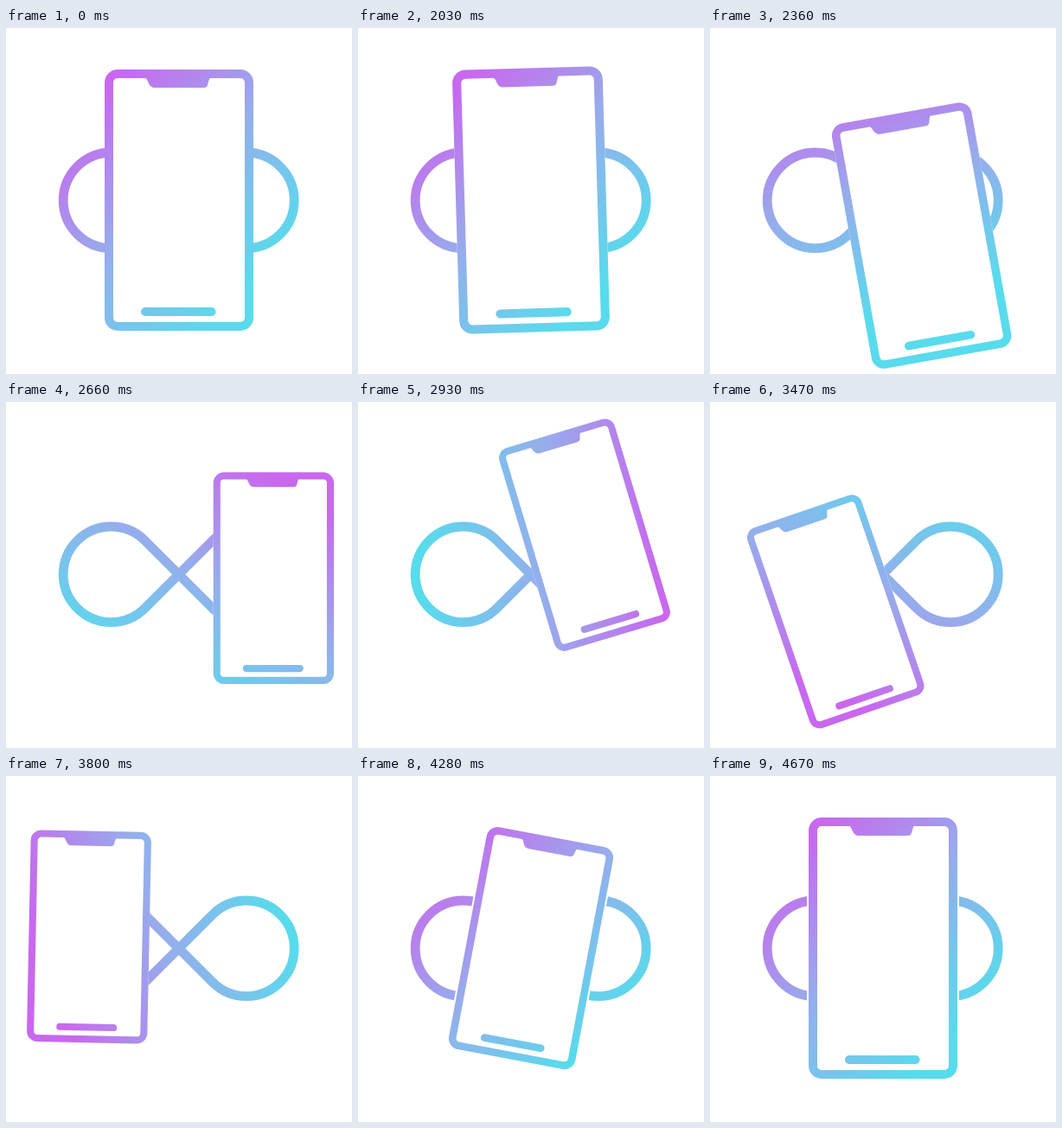
These frames come from a looping animation (400x400 px, 4700 ms). An HTML page with a canvas:

```html
<!DOCTYPE html>
<html lang="en">
<head>
<meta charset="utf-8">
<title>Phone on an infinity loop</title>
<style>
  html, body { margin: 0; width: 100%; height: 100%; overflow: hidden; background: #fff; }
  canvas { display: block; }
</style>
</head>
<body>
<canvas id="stage" width="400" height="400"></canvas>
<script>
const ctx = document.getElementById('stage').getContext('2d');
const LOOP = 4700, START = 2030, STEP = 30;
const CX = 200, CY = 199, RAD = Math.PI / 180;

// 0 before a, 1 after b, linear in between
const ramp = (t, a, b) => Math.min(1, Math.max(0, (t - a) / (b - a)));
// Rises from a to the peak, falls back to zero at b
const swing = (t, a, peak, b) => ramp(t, a, peak) - ramp(t, peak, b);

// Swell, shrink for the ride, then overshoot and settle
const scaleAt = t => 1 + .055 * ramp(t, 2000, 2160) - .245 * ramp(t, 2160, 2640)
  + .24 * ramp(t, 4220, 4480) - .05 * ramp(t, 4480, 4660);

const tiltAt = t => -14 * swing(t, 2000, 2250, 2650)
  - 35 * swing(t, 2670, 3215, 3770) + 13 * swing(t, 3740, 4400, 4670);

// Right lobe is 0..1, left lobe is 1..2
const progressAt = t => ramp(t, 2150, 3202) + .5 * ramp(t, 3202, 3758) + .5 * ramp(t, 3758, 4225);

const spinAt = t => 200 * ramp(t, 2000, 3170) ** 1.7 + 160 * ramp(t, 3170, 4200);

// Figure eight: two 270 degree arcs joined by crossing diagonals
function infinity(x, y, r) {
  const path = new Path2D(), d = r * Math.SQRT2;
  path.arc(x + d, y, r, 135 * RAD, -135 * RAD, true);
  path.arc(x - d, y, r, 45 * RAD, 315 * RAD);
  path.closePath();
  return path;
}

// Offset of a point moving along a smaller figure eight
function travel(p) {
  const left = p > 1, r = left ? 43.9 : 45.4;
  const length = 2 + 1.5 * Math.PI, d = (left ? p - 1 : p) * length;
  const angle = 135 * RAD - (d - 1), rest = length - d;
  let x = Math.SQRT2 + Math.cos(angle), y = Math.sin(angle);
  if (d < 1) x = y = d * Math.SQRT1_2;
  if (rest < 1) y = -(x = rest * Math.SQRT1_2);
  return [left ? -x * r : x * r, y * r];
}

const loopPath = infinity(199.7, 199.3, 55.3);
const body = new Path2D();
body.roundRect(-81, -146, 162, 292, 10);
const bar = new Path2D('M-39 129H37.5');
const notch = new Path2D('M-41 -143Q-37 -141 -35.5 -136Q-33 -130 -28 -130H28.5Q33 -130 33.5 -135L36 -143Z');

function gradient(t) {
  const angle = (spinAt(t) - 135) * RAD;
  const point = d => [CX + Math.cos(angle) * d, CY + Math.sin(angle) * d];
  const g = ctx.createLinearGradient(...point(152), ...point(-128));
  g.addColorStop(0, '#c868ee');
  g.addColorStop(.5, '#95aeec');
  g.addColorStop(1, '#58dbec');
  return g;
}

function draw(t) {
  const scale = scaleAt(t), paint = gradient(t);
  const [dx, dy] = travel(progressAt(t));
  const pose = new DOMMatrix().translate(CX + dx, CY + dy).rotate(tiltAt(t)).scale(scale);
  const place = part => {
    const path = new Path2D();
    path.addPath(part, pose);
    return path;
  };
  const outline = place(body);
  const stroke = (path, color, width) => {
    ctx.strokeStyle = color;
    ctx.lineWidth = width;
    ctx.stroke(path);
  };

  ctx.lineCap = 'round';
  ctx.fillStyle = '#fff';
  ctx.fillRect(0, 0, 400, 400);
  stroke(loopPath, paint, 10.8);

  // The phone hides the loop, with a margin that opens late in the ride
  ctx.fill(outline);
  stroke(outline, '#fff', 10 * scale + 4 * ramp(t, 3800, 4225));

  stroke(outline, paint, 10 * scale);
  stroke(place(bar), paint, 10 * scale);
  ctx.fillStyle = paint;
  ctx.fill(place(notch));
}

function frame() {
  const t = performance.now() % LOOP;
  draw(t < START ? 0 : START + Math.floor((t - START) / STEP) * STEP);
  requestAnimationFrame(frame);
}
frame();
</script>
</body>
</html>
```
